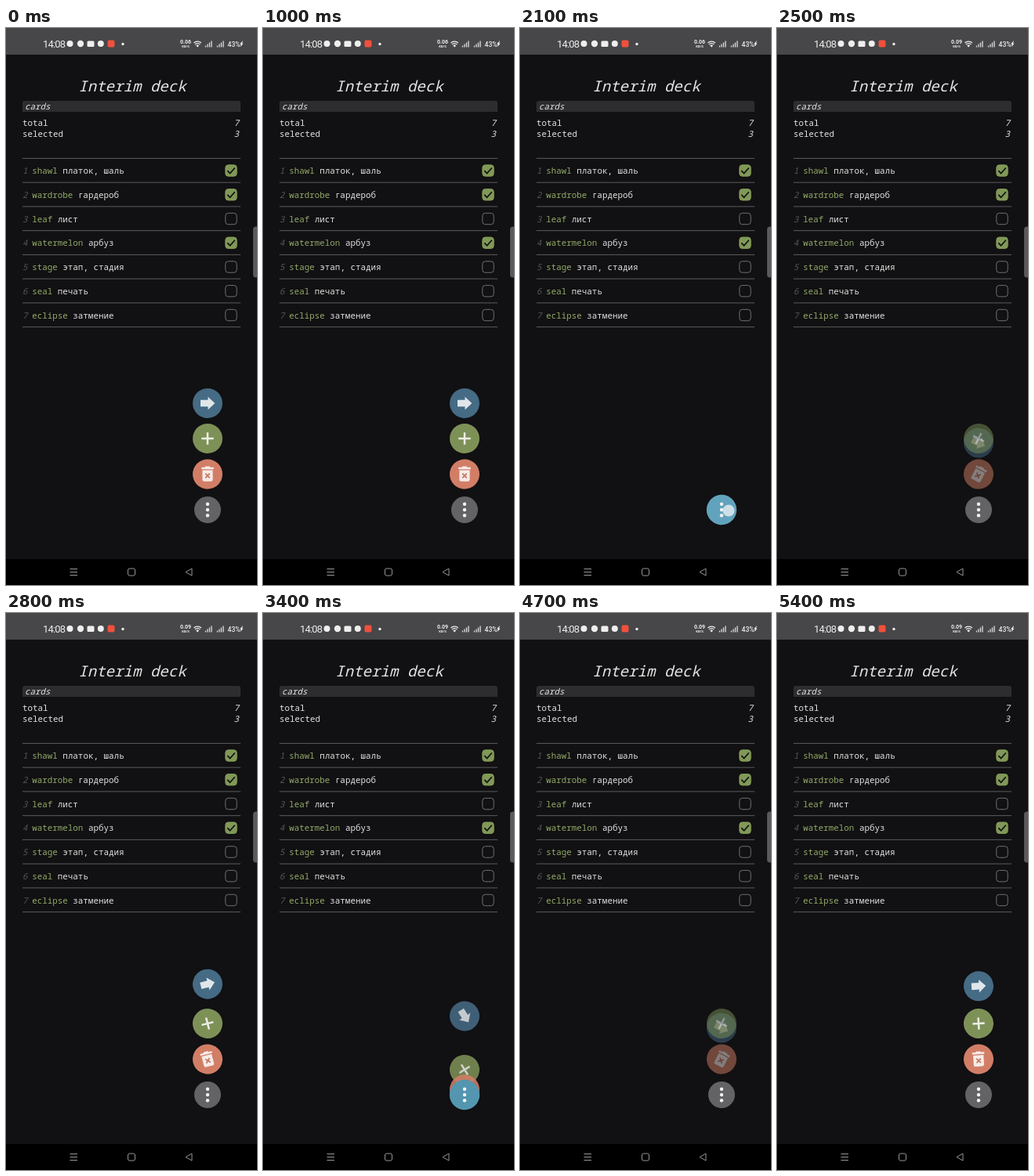
Recreate the animation shown at these times as an HTML page. Size 320x711 px, loop 5500 ms.

```html
<!DOCTYPE html>
<html lang="en">
<head>
<meta charset="utf-8">
<title>Interim deck</title>
<style>
html, body { margin: 0; width: 100%; height: 100%; overflow: hidden; background: #111012; }
svg { display: block; width: 320px; height: 711px; }
text { font: 10.85px "Noto Sans Mono", monospace; fill: #e4e4e4; white-space: pre; }
.it { font-style: italic; }
.end { text-anchor: end; }
.mid { text-anchor: middle; }
.ui { font-family: Roboto, sans-serif; fill: #eee; }
.line { stroke: #5c5b5e; }
.num { fill: #565558; font-style: italic; }
.word { fill: #92ab68; }
.box { fill: none; stroke: #6f6e72; }
.box.on { fill: #809957; stroke: #809957; }
.tick { fill: none; stroke: #111012; stroke-width: 1.7; }
.nav { fill: none; stroke: #969696; stroke-width: 1; }
</style>
</head>
<body>
<svg viewBox="0 0 320 711">
  <rect width="320" height="711" fill="#111012"/>
  <rect width="320" height="34" fill="#474648"/>
  <text class="ui" x="47" y="24.7" style="font-size:13px;letter-spacing:-.8px" textLength="0">14:08</text>
  <g fill="#eee">
    <circle cx="81.5" cy="20" r="4"/>
    <circle cx="95" cy="20" r="4.2"/>
    <rect x="103.5" y="16.5" width="9" height="7.5" rx="1.5"/>
    <circle cx="120.8" cy="20" r="4"/>
    <circle cx="149" cy="20.5" r="1.7"/>
    <path d="M298 20.5l4-4.5-1 3.7h1.6l-4 4.5 1-3.7z"/>
    <path d="M242.3 22.6a2.6 2.6 0 0 1 3.8 0l-1.9 2z"/>
  </g>
  <rect x="129.5" y="15.5" width="9" height="9" rx="2" fill="#f0503c"/>
  <text id="speed" class="ui mid" x="229" y="19.7" style="font-size:7px;font-weight:700"></text>
  <text class="ui mid" x="229" y="24.6" style="font-size:4.2px;font-weight:700">KB/S</text>
  <path d="M239.5 19a6.6 6.6 0 0 1 9.4 0M241 21a4.5 4.5 0 0 1 6.4 0" fill="none" stroke="#eee" stroke-width="1.2"/>
  <path d="M254.5 24.5v-2M257 24.5v-4M259.5 24.5v-6M262 24.5v-8M269.5 24.5v-2M272 24.5v-4M274.5 24.5v-6M277 24.5v-8" stroke="#ddd" stroke-width="1.3"/>
  <text class="ui" x="282.5" y="23.7" style="font-size:8.6px;font-weight:500">43%</text>

  <text class="it mid" x="161" y="81.3" style="font-size:19.1px;font-weight:500">Interim deck</text>
  <path d="M21 107V96q0-3 3-3H296q3 0 3 3v11z" fill="#2d2c2f"/>
  <text class="it" x="24" y="104">cards</text>
  <text x="21" y="124.5">total</text><text class="it end" x="297" y="124.5">7</text>
  <text x="21" y="139">selected</text><text class="it end" x="297" y="139">3</text>
  <g id="list"></g>

  <rect x="315" y="253.5" width="10" height="65" rx="3.5" fill="#5a595b"/>
  <rect y="678" width="320" height="33" fill="#000"/>
  <path class="nav" d="M81.5 690.5h9.5M81.5 694.5h9.5M81.5 698.5h9.5M237 690v9l-8-4.5z"/>
  <rect class="nav" x="155.5" y="690" width="9" height="9" rx="2"/>

  <g class="item"><circle r="19" fill="#456b85"/>
    <path d="M-9-4.3H.5v-4L9.3 0 .5 8.3v-4H-9z" fill="#e0e6ea"/></g>
  <g class="item"><circle r="19" fill="#7d9157"/>
    <path d="M-7.7 0H7.7M0-7.7V7.7" stroke="#eceee6" stroke-width="2.5"/></g>
  <g class="item"><circle r="19" fill="#d27e67"/>
    <path d="M-7.7-8.7h4.2l1-1.2h5l1 1.2h4.2v2.4H-7.7zM-6.6-5H6.6V7q0 2.3-2.3 2.3h-8.6Q-6.6 9.3-6.6 7z" fill="#f5ebe7"/>
    <path d="M-2.8-.8L2.8 4.8M2.8-.8L-2.8 4.8" stroke="#c97862" stroke-width="1.8"/></g>
  <g transform="translate(257 615)">
    <circle id="main"/>
    <g fill="#f2f2f2"><circle cy="-7.2" r="2.2"/><circle r="2.2"/><circle cy="7.2" r="2.2"/></g>
    <circle id="touch" cx="9" cy="1" r="7.5" fill="#e8eef0" opacity=".8"/>
  </g>
</svg>
<script>
const LOOP = 5500, HOME = 615;
const $ = id => document.getElementById(id);
const clamp = x => Math.min(1, Math.max(0, x));
const smooth = x => (x = clamp(x)) * x * (3 - 2 * x);
const mix = (a, b, p) => a + (b - a) * p;

const cards = [
  ['shawl', 'платок, шаль', 1], ['wardrobe', 'гардероб', 1], ['leaf', 'лист', 0],
  ['watermelon', 'арбуз', 1], ['stage', 'этап, стадия', 0], ['seal', 'печать', 0],
  ['eclipse', 'затмение', 0]
];
const rule = y => `<path class="line" d="M21 ${y}H299"/>`;
$('list').innerHTML = rule(166.4) + cards.map(([word, meaning, on], i) => {
  const y = 166.4 + i * 30.75;
  return `<text class="num" x="21" y="${y + 19.7}">${i + 1}</text>
    <text x="33.3" y="${y + 19.7}"><tspan class="word">${word}</tspan> ${meaning}</text>
    <rect class="box ${on ? 'on' : ''}" x="279.8" y="${y + 8.4}" width="14.4" height="14.4" rx="3.5"/>
    ${on ? `<path class="tick" d="M282.3 ${y + 15.8}l3.3 3.3 6.2-7"/>` : ''}` + rule(y + 30.75);
}).join('');

// CSS-style cubic bezier, solved by bisection
function bezier(x1, y1, x2, y2) {
  const at = (u, a, b) => 3 * (1 - u) ** 2 * u * a + 3 * (1 - u) * u * u * b + u ** 3;
  return x => {
    if (x <= 0 || x >= 1) return clamp(x);
    let lo = 0, hi = 1;
    for (let i = 0; i < 24; i++) {
      const u = (lo + hi) / 2;
      if (at(u, x1, x2) < x) lo = u; else hi = u;
    }
    return at(lo, y1, y2);
  };
}
const rise = bezier(.3, .6, .3, 1.3);
const spin = bezier(.175, .885, .32, 1.275);

// Toggles of the menu; each is preceded by a press
const toggles = [
  { at: -1050, open: true, press: 150 },
  { at: 1172, open: false, press: 120 },
  { at: 2250, open: true, press: 250 },
  { at: 3200, open: false, press: 120 },
  { at: 4450, open: true, press: 150 }
];
const items = [...document.querySelectorAll('.item')].map((el, i) => ({
  el, lift: [136, 91, 45.5][i], openTime: [1000, 250, 180][i], closeTime: [600, 335, 265][i]
}));

const GREY = [99, 98, 100], BLUE = [84, 150, 176];

function draw(t) {
  const { at, open } = toggles.findLast(g => g.at <= t);
  const s = t - at;
  const turn = open ? 1 - spin(s / 1000) : smooth(s / 530);
  const alpha = open ? clamp(s / 500) : clamp(1 - (s / 560) ** 2);
  for (const { el, lift, openTime, closeTime } of items) {
    const p = open ? rise(s / openTime) : 1 - smooth(s / closeTime);
    el.setAttribute('transform', `translate(257 ${HOME - lift * p}) rotate(${180 * turn})`);
    el.setAttribute('opacity', alpha);
  }
  const closed = open ? 1 - smooth(s / 200) : smooth(s / 200);
  const pressed = toggles.some(g => t >= g.at - g.press && t < g.at);
  const glow = pressed ? 13 : 0;
  $('main').setAttribute('r', mix(17, 19.2, closed));
  $('main').setAttribute('fill', `rgb(${GREY.map((c, i) => mix(c, BLUE[i], closed) + glow)})`);
  $('touch').style.display = pressed ? '' : 'none';
  $('speed').textContent = t < 2300 ? '0.06' : '0.09';
}

function tick() {
  draw(performance.now() % LOOP);
  requestAnimationFrame(tick);
}
tick();
</script>
</body>
</html>
```
